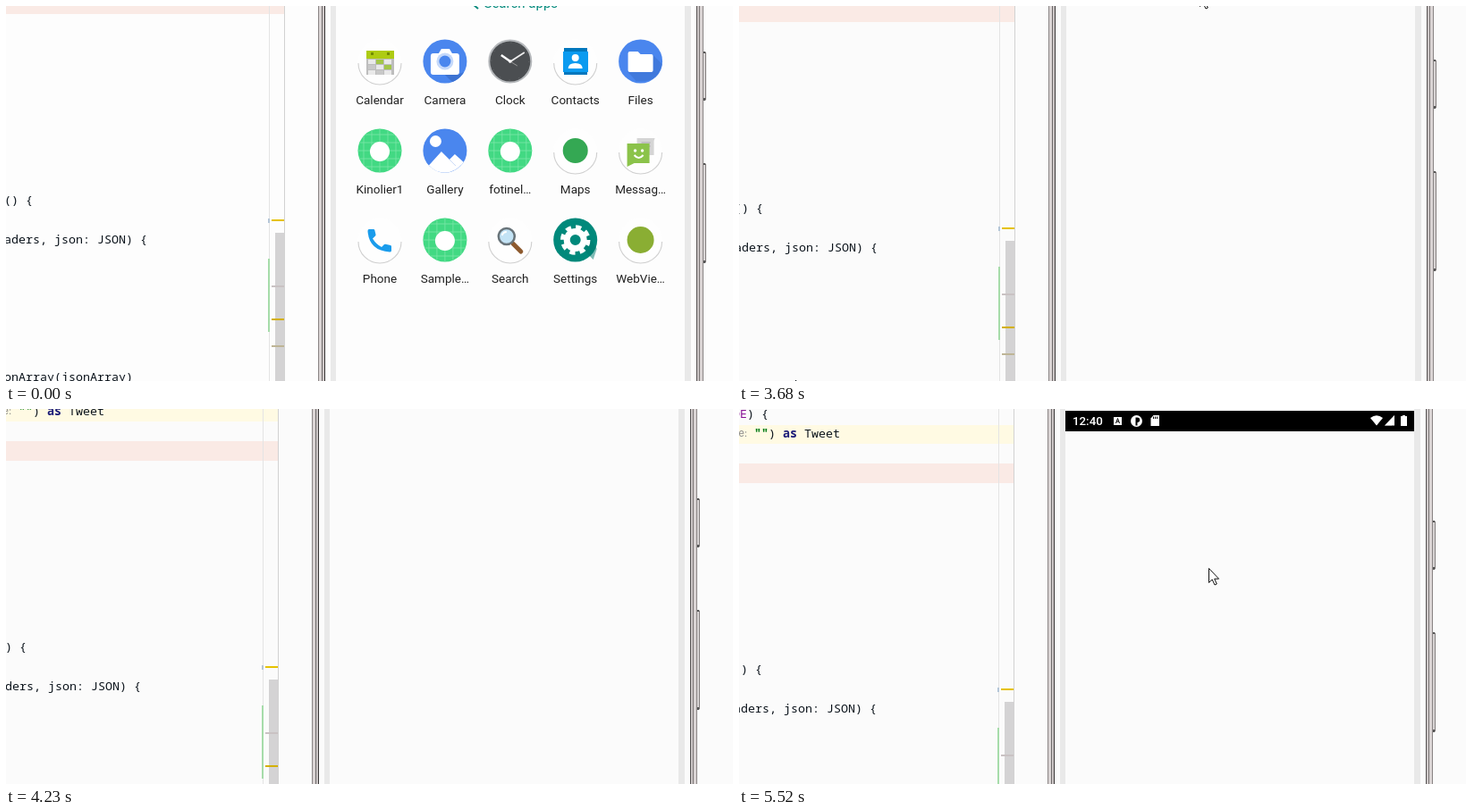
An HTML page that plays this animation: 813 px wide and 420 px high, repeating every 8000 ms.

```html
<!DOCTYPE html>
<html lang="en">
<head>
<meta charset="utf-8">
<title>App launch</title>
<style>
  html, body { margin: 0; width: 100%; height: 100%; overflow: hidden; background: #fdfdfd; }
  svg { display: block; position: absolute; left: 0; top: 0; }
  text { white-space: pre; }
  rect { shape-rendering: crispEdges; }
  .code { font: 13.33px "Noto Sans Mono", "DejaVu Sans Mono", monospace; fill: #0c141c; }
  .bold { font-weight: 700; }
  .label { font: 13.5px Roboto, Arial, sans-serif; fill: #212121; text-anchor: middle; }
</style>
</head>
<body>
<svg width="813" height="420" viewBox="0 0 813 420">
  <rect id="back" width="813" height="420" fill="#fdfdfd"/>
  <g id="scene">
    <g id="editor"></g>
    <g id="phone"></g>
    <rect id="blank" x="386" y="0" width="357" height="314" fill="#fbfbfb"/>
    <g id="status"></g>
    <g id="apps"></g>
  </g>
  <path id="cursor" d="M.5 .5V16.5L4.2 13L7 19L9.3 18L6.7 12.2H11.6Z" fill="#fff" stroke="#111" stroke-linejoin="round"/>
</svg>
<script>
const $ = id => document.getElementById(id);
const rect = (x, y, w, h, fill, more = "") =>
  `<rect x="${x}" y="${y}" width="${w}" height="${h}" fill="${fill}" ${more}/>`;
const circle = (x, y, r, fill, more = "") =>
  `<circle cx="${x}" cy="${y}" r="${r}" fill="${fill}" ${more}/>`;
const path = (d, fill, more = "") => `<path d="${d}" fill="${fill}" ${more}/>`;
const line = (d, stroke, w, more = "") =>
  `<path d="${d}" fill="none" stroke="${stroke}" stroke-width="${w}" ${more}/>`;
const code = (x, y, s, more = "") => `<text class="code" x="${x}" y="${y}" ${more}>${s}</text>`;

// Code editor with its marker strip and scrollbar
$("editor").innerHTML =
  rect(-10, -56, 321, 21, "#fffae3") +
  rect(-10, -13, 321, 22, "#faeae5") +
  rect(294, -80, 1, 520, "#e4e4e4") +
  rect(301, 254, 10, 200, "#d4d3d4") +
  rect(311, -80, 1, 520, "#d2d2d2") +
  rect(293, 238, 2, 5, "#b4c6d8") +
  rect(293, 283, 2, 82, "#a6dcaa") +
  rect(297, 239, 14, 2, "#e6c200") +
  rect(297, 313, 14, 2, "#c9c2c3") +
  rect(297, 350, 14, 2, "#d3b000") +
  rect(297, 380, 14, 2, "#beb596") +
  code(-3, -64, "DE", 'font-style="italic" style="fill:#871094"') +
  code(13, -64, ") {") +
  code(-3, -43, "ne:", 'style="font:11px Inter,sans-serif;fill:#8a8a8a"') +
  code(21, -42, '""', 'style="fill:#067d17;font-weight:700"') +
  code(37, -42, ")") +
  code(53, -42, "as", 'style="fill:#1c1c78;font-weight:700"') +
  code(77, -42, "Tweet") +
  code(-2, 222, "() {") +
  code(-2, 266, "aders, json: JSON) {") +
  code(-2, 420, "onArray(jsonArray)");

// Phone body: metal edges as thin vertical stripes
const stripes = [
  [349, 1, "#8a8585"], [350, 3, "#dad4d4"], [353, 1, "#6e6a6a"], [354, 2, "#cdc7c7"], [356, 1, "#393636"],
  [363, 6, "#e9e9e9"], [759, 7, "#e9e9e9"],
  [772, 1, "#565252"], [773, 2, "#cdc7c7"], [775, 1, "#7b7676"], [776, 3, "#dad4d4"], [779, 1, "#8a8585"]
];
const sideKey = (y, h) =>
  rect(780, y, 3, h, "#d8d4d4") + rect(782, y + 1, 1, h - 2, "#858080") +
  rect(780, y, 2, 2, "#555") + rect(780, y + h - 3, 2, 3, "#555");
$("phone").innerHTML =
  stripes.map(([x, w, c]) => rect(x, -80, w, 520, c)).join("") + sideKey(51, 55) + sideKey(176, 112);

$("status").innerHTML =
  rect(369, -72, 390, 23, "#000") +
  `<text x="377" y="-56" style="font:500 13.3px Roboto,sans-serif;fill:#fff">12:40</text>` +
  rect(423, -65, 9, 9, "#fff", 'rx="1"') +
  line("M425.5 -58L427.5 -63.5L429.5 -58M426 -60H429", "#000", 1) +
  circle(448.5, -60.5, 6.5, "#fff") +
  path("M447.5 -64.5h2a2.7 2.7 0 0 1 0 5.4v3.5h-2z", "#000") +
  path("M467.500 -67H474V-55H464.500V-63.500Z", "#fff") +
  line("M467.500 -65.500v2.500M469.500 -65.500v2.500M471.500 -65.500v2.500", "#000", 1) +
  path("M710 -64Q717 -69.500 724 -64L717 -55.500Z", "#fff") +
  path("M726 -55.500H737V-67Z", "#fff") +
  path("M734 -55.500V-63H737V-67L726 -55.500Z", "#fff", 'opacity=".5"') +
  rect(744, -66, 7, 11, "#fff", 'rx="1"') + rect(746, -67, 3, 1, "#fff");

// Icons are drawn around their own centre
const R = 24.5;
const disc = fill => circle(0, 0, R, fill);
const paper = circle(0, 0, R, "#fefefe") +
  line("M-24 2A24 24 0 0 0 24 2", "#cfcfcf", 1.1);
const grid = () => {
  let d = "";
  for (let i = -18; i <= 18; i += 9) {
    const k = Math.sqrt(R * R - i * i);
    d += `M${i} ${-k}V${k}M${-k} ${i}H${k}`;
  }
  return disc("#42d983") + line(d, "#7be6a9", .8) + circle(0, 1, 11, "#fff");
};
const cells = () => {
  let s = "";
  for (let i = 0; i < 9; i++)
    s += rect(-13 + (i % 3) * 9, -2 + Math.floor(i / 3) * 6, 8, 5, i % 4 == 1 ? "#a3c64a" : i % 2 ? "#c8c8c8" : "#e9e9e9");
  return s;
};

const icons = {
  Calendar: paper + rect(-15, -12, 31, 27, "#bdbdbd") + rect(-15, -12, 31, 9, "#aecb13") +
    rect(-10, -10, 3, 3, "#728c00") + rect(8, -10, 3, 3, "#728c00") + cells(),
  Camera: disc("#4a86ee") +
    path("M0 15L14 15L21 12A24.500 24.500 0 0 1 8 23Z", "#3d73d2") +
    path("M-13 -9H-7L-4 -14H5L8 -9H13Q16 -9 16 -6V12Q16 15 13 15H-13Q-16 15 -16 12V-6Q-16 -9 -13 -9Z", "#fff") +
    circle(0, 0, 9.500, "#c5d9fa") + circle(0, 0, 6.5, "#4a86ee"),
  Clock: circle(0, 0, 23.5, "#4b4e51", 'stroke="#b5b8bb" stroke-width="2"') +
    circle(0, 0, 21, "none", 'stroke="#6a6d70" stroke-dasharray="1 10"') +
    line("M0 0L-10 -7", "#fff", 2.5) + line("M-1 1L16 -10", "#eee", 1.8) +
    line("M0 0L8 5", "#999", 1) + circle(0, 0, 1.8, "#fff"),
  Contacts: paper + rect(-13, -15, 26, 5, "#0277bd") + rect(-13, 10, 26, 5, "#0277bd") +
    rect(-14, -11, 28, 23, "#0b9bf0", 'rx="1"') + circle(0, -4, 4, "#fff") +
    path("M-8 8Q-8 2 0 2Q8 2 8 8Z", "#fff"),
  Files: disc("#4a86ee") + path("M-14 12L-5 22Q20 25 24 3L14 -7Z", "#4079dc") +
    path("M-12 -11H-3L0 -8H12Q14 -8 14 -6V10Q14 12 12 12H-12Q-14 12 -14 10V-9Q-14 -11 -12 -11Z", "#fff"),
  Kinolier1: grid(),
  Gallery: disc("#4a86ee") + circle(-10.5, -10.5, 6.5, "#fff") +
    path("M-18 16.500L-4 1L5 10L11 4L21 13Q12 24.500 0 24.500Q-11 24.500 -18 16.500Z", "#fff") +
    line("M5 10L12 17", "#c9daf8", 1),
  "fotinel…": grid(),
  Maps: paper + circle(0, 0, 14, "#34a853"),
  "Messag…": paper + path("M-4 -14H16L15 -11V5H-4Z", "#d5d5d5") + line("M1 -9H11M1 -5H11", "#b8b8b8", 1.500) +
    path("M-15 -8H10V14H-7L-15 18Z", "#8bc34a") + circle(-6, 0, 1.7, "#fff") + circle(2, 0, 1.7, "#fff") +
    line("M-7 5Q-2 11 3 5", "#fff", 2),
  Phone: paper + path("M-12 -12H-7Q-6 -12 -5.700 -11L-4.500 -6Q-4.500 -5 -5 -4.500L-8 -1.500Q-4 5 2 8L5 5Q5.700 4.500 6.500 4.700L12 6Q13 6.300 13 7.500V12Q13 13.500 11 13.500Q-12 12 -13.500 -10Q-13.500 -12 -12 -12Z", "#1a9cec"),
  "Sample…": grid(),
  Search: paper + line("M3 4L12 13", "#8d5a2f", 5, 'stroke-linecap="round"') +
    circle(-4, -4, 9, "#c3e3f5", 'stroke="#69747a" stroke-width="2.500"') +
    line("M-9 -5Q-8 -9 -4 -9", "#fff", 2),
  Settings: disc("#00897b") + path("M10 12L20 22L24 10L13 -8Z", "#007a6e", 'opacity=".5"') +
    circle(0, 0, 9.5, "none", 'stroke="#fff" stroke-width="7"') +
    circle(0, 0, 14.5, "none", 'stroke="#fff" stroke-width="4.500" stroke-dasharray="6.200 5.190"'),
  "WebVie…": paper + circle(0, 0, 15, "#8aae33")
};

$("apps").innerHTML =
  `<text x="534.500" y="2" style="font:15px Roboto,sans-serif;fill:#00897b">Search apps</text>` +
  line("M522 -2L528 3", "#00897b", 2) +
  Object.entries(icons).map(([name, art], i) => {
    const x = 418 + (i % 5) * 72.9, y = 62 + Math.floor(i / 5) * 100;
    return `<g transform="translate(${x} ${y})">${art}</g>` +
      `<text class="label" x="${x}" y="${y + 48}">${name}</text>`;
  }).join("");

// [time, x, y]
const scroll = [
  [0, 0, 0], [3680, -3, 9], [3800, -6, 21], [3920, -8, 32], [4070, -8, 41],
  [4230, -7, 49], [4350, -5, 55], [4500, -4, 61], [4650, -4, 67], [4800, -4, 74]
];
const pointer = [
  [0, 0, -60], [2800, 655, 196], [2920, 628, 95], [3040, 596, 2], [3160, 560, -40],
  [3440, 515, -17], [3680, 515, -16], [3800, 516, -16], [3920, 516, -30], [4500, 517, -18],
  [4650, 516, -16], [4950, 510, -13], [5100, 507, -9], [5230, 512, -2], [5370, 528, 114], [5520, 525, 178]
];
const at = (steps, t) => steps.findLast(s => s[0] <= t);
const place = (id, [, x, y]) => $(id).setAttribute("transform", `translate(${x} ${y})`);
const show = (id, on) => $(id).setAttribute("visibility", on ? "visible" : "hidden");

function draw() {
  const t = performance.now() % 8000;
  place("scene", at(scroll, t));
  place("cursor", at(pointer, t));
  show("apps", t < 120);
  show("blank", t >= 120 && t < 3680);
  $("back").setAttribute("fill", t < 3680 ? "#fdfdfd" : "#fbfbfb");
  requestAnimationFrame(draw);
}
draw();
</script>
</body>
</html>
```
